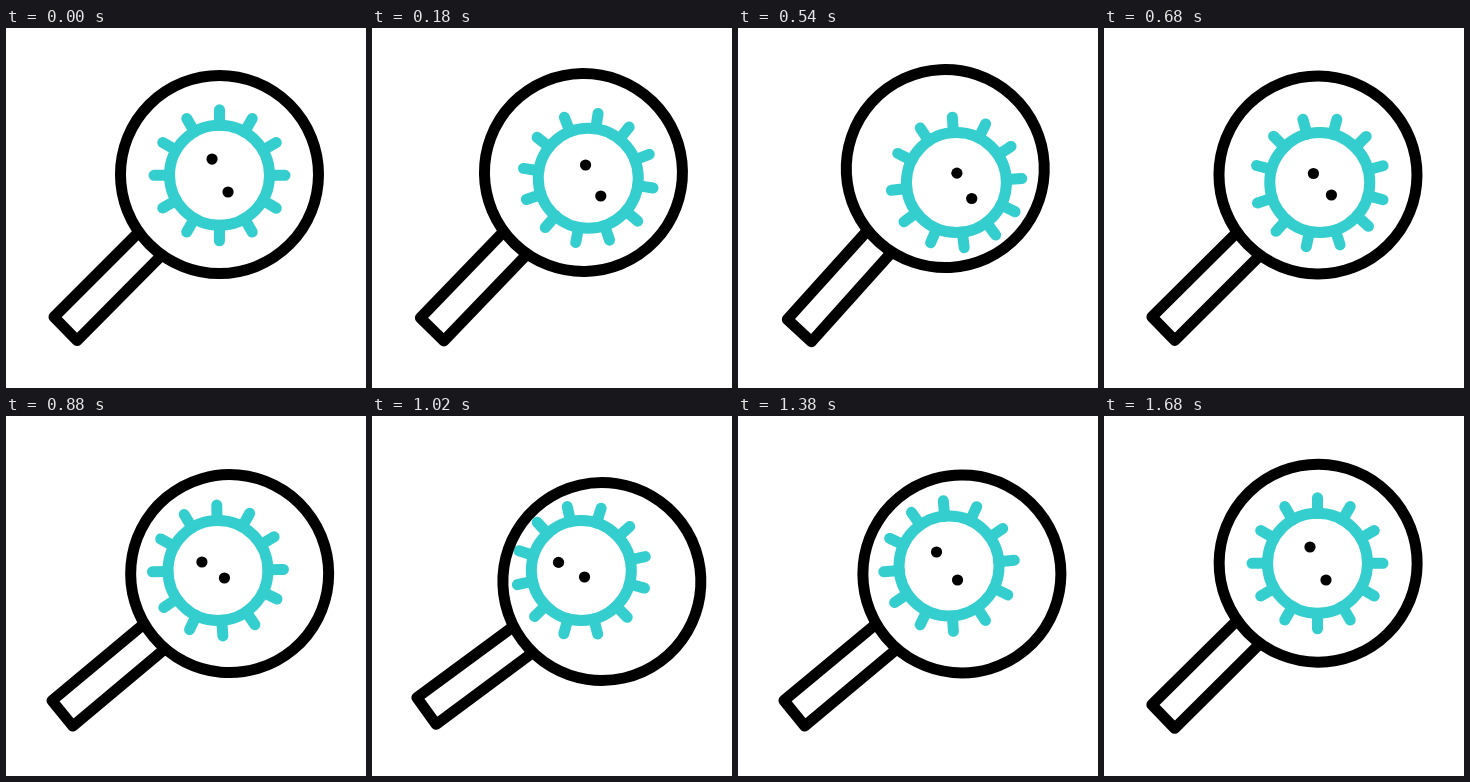
Animation of 360x360 px, one loop 1700 ms. Source, as an HTML page:

```html
<!DOCTYPE html>
<html lang="en">
<head>
<meta charset="utf-8">
<title>Virus under a magnifier</title>
<style>
  html, body { margin: 0; width: 100%; height: 100%; overflow: hidden; background: #fff; }
  svg { display: block; width: 100vw; height: 100vh; }
</style>
</head>
<body>
<svg viewBox="0 0 360 360" fill="none" stroke-width="11" stroke-linecap="round" stroke-linejoin="round">
  <g id="virus" stroke="#34cece">
    <circle r="50"/>
    <path id="upper"/>
    <path id="lower"/>
  </g>
  <circle id="dotA" r="5.6" fill="#000"/>
  <circle id="dotB" r="5.6" fill="#000"/>
  <g id="glass" stroke="#000">
    <circle cx="213.5" cy="146.5" r="99"/>
    <path d="M131 206 L48 289 L71 312.5 L154 229"/>
  </g>
</svg>
<script>
const LOOP = 1700;
const SPIKE_DELAY = 40;
const byId = id => document.getElementById(id);

// Goes from rest to value a at time ta, across to b at tb, and is back at rest by end
const sway = (rest, ta, a, tb, b, end) => t => {
  const mix = (from, to, u) => from + (to - from) * Math.max(0, Math.min(1, u));
  if (t < ta) return mix(rest, a, t / ta);
  if (t < tb) return mix(a, b, (t - ta) / (tb - ta));
  return mix(b, rest, (t - tb) / (end - tb));
};

const swing = sway(0, 550, -3, 1085, 10.2, LOOP);
const spin = sway(0, 472, 28.8, 1011, -14.8, 1510);
const virus = {
  x: sway(213.5, 442, 220.3, 1096, 207.9, 1605),
  y: sway(147.3, 455, 154.6, 1056, 154.6, 1575)
};
const dotA = {
  x: sway(206, 452, 224.9, 1020, 186.5, 1605),
  y: sway(131, 416, 144.8, 1067, 146.5, 1530)
};
const dotB = {
  x: sway(222, 437, 238.4, 1015, 212.4, 1508),
  y: sway(164, 424, 173.4, 946, 160.4, 1380)
};

const transform = (id, value) => byId(id).setAttribute("transform", value);
const move = (id, path, t) => transform(id, `translate(${path.x(t)} ${path.y(t)})`);

function draw(t) {
  move("virus", virus, t);
  move("dotA", dotA, t);
  move("dotB", dotB, t);
  transform("lower", `rotate(${spin(t)})`);
  transform("upper", `rotate(${spin(Math.max(0, t - SPIKE_DELAY))})`);
  transform("glass", `rotate(${swing(t)} 95.4 264.6)`);
}

// Spikes every 30 degrees, clockwise from the given angle
function spikes(first, count) {
  return Array.from({ length: count }, (_, i) => {
    const angle = (first + 30 * i) * Math.PI / 180;
    const c = Math.cos(angle), s = Math.sin(angle);
    return `M${50 * c} ${50 * s}L${65.5 * c} ${65.5 * s}`;
  }).join("");
}

byId("lower").setAttribute("d", spikes(30, 5));
byId("upper").setAttribute("d", spikes(180, 7));

const start = performance.now();
function frame() {
  draw((performance.now() - start) % LOOP);
  requestAnimationFrame(frame);
}
draw(0);
frame();
</script>
</body>
</html>
```
